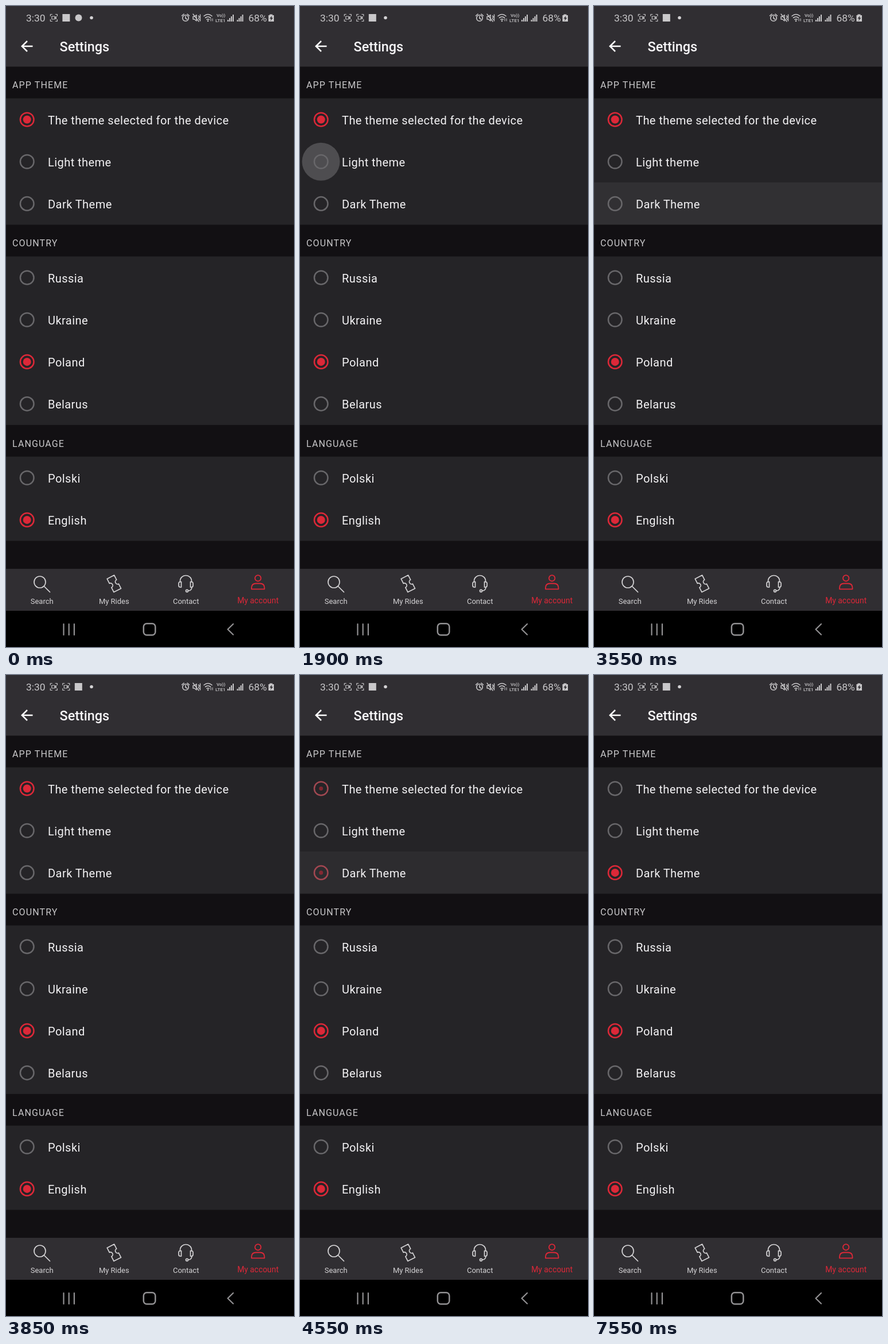
Animation, 502 px wide and 1115 px high, one loop 8000 ms. Source, as an HTML page:

```html
<!DOCTYPE html>
<html lang="en">
<head>
<meta charset="utf-8">
<title>Settings</title>
<style>
  html, body { margin: 0; width: 100%; height: 100%; overflow: hidden; background: #000; }
  svg { display: block; width: 502px; height: 1115px; font-family: Roboto, sans-serif; }
  .line { fill: none; stroke-linecap: round; stroke-linejoin: round; }
  .option { font-size: 20px; letter-spacing: .45px; fill: #f3f2f4; }
  .section { font-size: 16px; letter-spacing: 1.12px; fill: #c9c8ca; }
  .tab { font-size: 13px; text-anchor: middle; fill: #d4d3d5; }
  .status { font-size: 17.4px; fill: #c9c8ca; }
</style>
</head>
<body>
<svg viewBox="0 0 502 1115">
  <defs>
    <path id="corners" class="line" stroke="#c4c3c5" stroke-width="1.2"
      d="M-6-3V-6H-3M3-6H6V-3M6 3V6H3M-3 6H-6V3"/>
    <path id="camera" class="line" stroke="#c4c3c5" stroke-width="1.2"
      d="M-3.5-2.5H1.5V2.5H-3.5ZM1.5 0L4-2V2Z"/>
  </defs>

  <rect width="502" height="1052" fill="#121013"/>
  <rect width="502" height="105.5" fill="#302e32"/>
  <rect y="979" width="502" height="73" fill="#302e32"/>
  <g id="list"></g>

  <!-- Status bar -->
  <text class="status" x="35" y="27">3:30</text>
  <g id="recorder"><use href="#corners"/><use id="recorderCamera" href="#camera"/></g>
  <g id="saved"><use href="#corners"/><use href="#camera"/></g>
  <rect id="appMark" x="-6.5" y="-6.5" width="13" height="13" fill="#c9c8ca"/>
  <circle id="oldMark" cx="126.5" cy="20.5" r="6" fill="#c9c8ca"/>
  <circle cx="149" cy="20.5" r="2.8" fill="#d4d3d5"/>
  <g class="line" stroke="#c9c8ca" stroke-width="1.6">
    <circle cx="313" cy="21" r="5.3"/>
    <path d="M313 18V21.5L315.5 23M306.5 17L310 14M316 14L319.5 17"/>
    <path d="M326 18.5H328.5L332 15.5V26L328.5 23H326ZM326 14L336 27M335.5 17L337 19L335.5 21.5L337 24M338.5 15V26" stroke-width="1.4"/>
    <path d="M345 17.5Q352 11.5 359 17.5M347.5 20.5Q352 17 356.5 20.5M350 23.5Q352 22 354 23.5"/>
    <path d="M357 26V22M360 22V26" stroke-width="1"/>
  </g>
  <circle cx="352" cy="26" r="1.3" fill="#c9c8ca"/>
  <g fill="#c9c8ca" font-size="8" font-weight="500">
    <text x="367" y="19">Vo))</text><text x="365" y="27.5">LTE1</text>
  </g>
  <g id="signals" fill="#c9c8ca"></g>
  <text class="status" x="422.5" y="27">68%</text>
  <path d="M459.5 14.5H464.5V16H467V27H457.5V16H459.5Z" fill="#c9c8ca"/>
  <path d="M463.5 17L459.5 22H462L461 26L465.5 20.5H463Z" fill="#302e32"/>

  <!-- Title bar -->
  <path class="line" d="M46.5 70H28M37 61L27.8 70L37 79" stroke="#fff" stroke-width="2.5" style="stroke-linecap:butt;stroke-linejoin:miter"/>
  <text x="93.5" y="79" font-size="23.4" font-weight="500" fill="#f7f6f8">Settings</text>

  <!-- Tabs -->
  <g class="line" stroke="#d4d3d5" stroke-width="1.7">
    <circle cx="59" cy="1002" r="10"/><path d="M66.5 1009.5L76.5 1019.5"/>
    <path transform="translate(188.3 1004.8) rotate(-27)"
      d="M-7-13H7V-4A3.5 3.5 0 0 0 7 4V13H-7V4A3.5 3.5 0 0 0-7-4Z"/>
    <path d="M303.5 1002V1000A10 9.5 0 0 1 323.5 1000V1002M305.5 1001.5V1011H304Q301 1011 301 1008V1004.5Q301 1001.5 304 1001.5ZM321.5 1001.5V1011H323Q326 1011 326 1008V1004.5Q326 1001.5 323 1001.5ZM324 1011Q323.5 1017 318 1017"/>
    <circle cx="315.5" cy="1017.3" r="2"/>
  </g>
  <g class="line" stroke="#dc2838" stroke-width="1.8">
    <circle cx="439.2" cy="995.3" r="5.2"/>
    <path d="M428 1014.3V1012Q428 1004.5 436 1004.5H442.5Q450.5 1004.5 450.5 1012V1014.3Z"/>
  </g>
  <text class="tab" x="62.7" y="1039.5">Search</text>
  <text class="tab" x="188.3" y="1039.5">My Rides</text>
  <text class="tab" x="313.7" y="1039.5">Contact</text>
  <text class="tab" x="439.2" y="1039" style="font-size:13.9px;fill:#dc2838">My account</text>

  <!-- System navigation -->
  <g class="line" stroke="#929193" stroke-width="2.2">
    <path d="M100.5 1075V1094M109.7 1075V1094M118.9 1075V1094"/>
    <rect x="239.8" y="1074.3" width="20.5" height="20" rx="5.5" stroke-width="2.5"/>
    <path d="M396 1075L386.5 1084.3L396 1093.5"/>
  </g>
</svg>

<script>
const LOOP = 8000;
const RED = [220, 40, 56], GREY = [104, 103, 106];
const $ = id => document.getElementById(id);

function add(parent, tag, attributes, text = '') {
  const node = document.createElementNS('http://www.w3.org/2000/svg', tag);
  for (const name in attributes) node.setAttribute(name, attributes[name]);
  node.textContent = text;
  parent.append(node);
  return node;
}

const list = $('list');

function addRadio(y, label) {
  const wash = add(list, 'rect', { y: y - 37, width: 502, height: 73.5, fill: '#fff', opacity: 0 });
  const ripple = add(list, 'circle', { cx: 36.5, cy: y, fill: '#fff', opacity: 0 });
  const ring = add(list, 'circle', { cx: 36.7, cy: y, r: 11.8, fill: 'none', 'stroke-width': 2.5 });
  const dot = add(list, 'circle', { cx: 36.7, cy: y, fill: '#dc2838' });
  add(list, 'text', { x: 73, y: y + 8, class: 'option' }, label);
  return { wash, ripple, ring, dot };
}

function addSection(top, title, labels) {
  add(list, 'text', { x: 11, y: top + 38, class: 'section' }, title);
  add(list, 'rect', { y: top + 55.3, width: 502, height: labels.length * 73.3, fill: '#252427' });
  return labels.map((label, i) => addRadio(top + 92.2 + i * 73.2, label));
}

const [device, light, dark] = addSection(105.3, 'APP THEME',
  ['The theme selected for the device', 'Light theme', 'Dark Theme']);
const countries = addSection(380.3, 'COUNTRY', ['Russia', 'Ukraine', 'Poland', 'Belarus']);
const languages = addSection(728.5, 'LANGUAGE', ['Polski', 'English']);

for (const x of [386, 402.5])
  for (let i = 0; i < 4; i++)
    add($('signals'), 'rect', { x: x + i * 3, y: 24 - i * 3, width: 2, height: 3 + i * 3 });

// Linear progress of t from one time to another, clamped to 0..1.
const ramp = (t, from, to) => Math.min(1, Math.max(0, (t - from) / (to - from)));
const mix = (a, b, p) => a + (b - a) * p;

function setRadio({ ring, dot }, p) {
  ring.setAttribute('stroke', `rgb(${GREY.map((c, i) => Math.round(mix(c, RED[i], p)))})`);
  dot.setAttribute('r', 7 * p);
  dot.setAttribute('opacity', p);
}

// Each press is [start, fully in, release, gone].
function setRipple({ ripple }, t, presses) {
  const [start, full, release, gone] = presses.findLast(p => t >= p[0]) || presses[0];
  const grow = 1 - (1 - ramp(t, start, full)) ** 2;
  ripple.setAttribute('r', mix(18, 33, grow));
  ripple.setAttribute('opacity', .19 * grow * (1 - ramp(t, release, gone)));
}

function setWash({ wash }, t, presses) {
  const level = ([start, full, release, gone]) => ramp(t, start, full) - ramp(t, release, gone);
  wash.setAttribute('opacity', .055 * Math.max(...presses.map(level)));
}

function place(id, x, opacity = 1) {
  $(id).setAttribute('transform', `translate(${x} 20.5)`);
  $(id).setAttribute('opacity', opacity);
}

[...countries, ...languages].forEach(radio => setRadio(radio, 0));
setRadio(countries[2], 1);
setRadio(languages[1], 1);

function draw(t) {
  const shift = ramp(t, 0, 300);
  place('recorder', 83.3, shift);
  place('saved', mix(83.3, 104.8, shift));
  place('appMark', mix(104.8, 126.3, shift));
  $('oldMark').setAttribute('opacity', 1 - shift);
  $('recorderCamera').setAttribute('opacity', Math.floor((t + 950) / 500) % 2);

  setRipple(light, t, [[500, 800, 1200, 1400], [1500, 1900, 2250, 2350]]);
  setRipple(dark, t, [[5000, 5250, 5500, 5800], [5900, 6200, 6450, 6700]]);
  setWash(dark, t, [[3200, 3400, 3750, 3850], [4150, 4350, 4500, 4650]]);

  const chosen = ramp(t, 4450, 4650);
  setRadio(device, 1 - chosen);
  setRadio(light, 0);
  setRadio(dark, chosen);
}

function tick() {
  draw(performance.now() % LOOP);
  requestAnimationFrame(tick);
}
tick();
</script>
</body>
</html>
```
